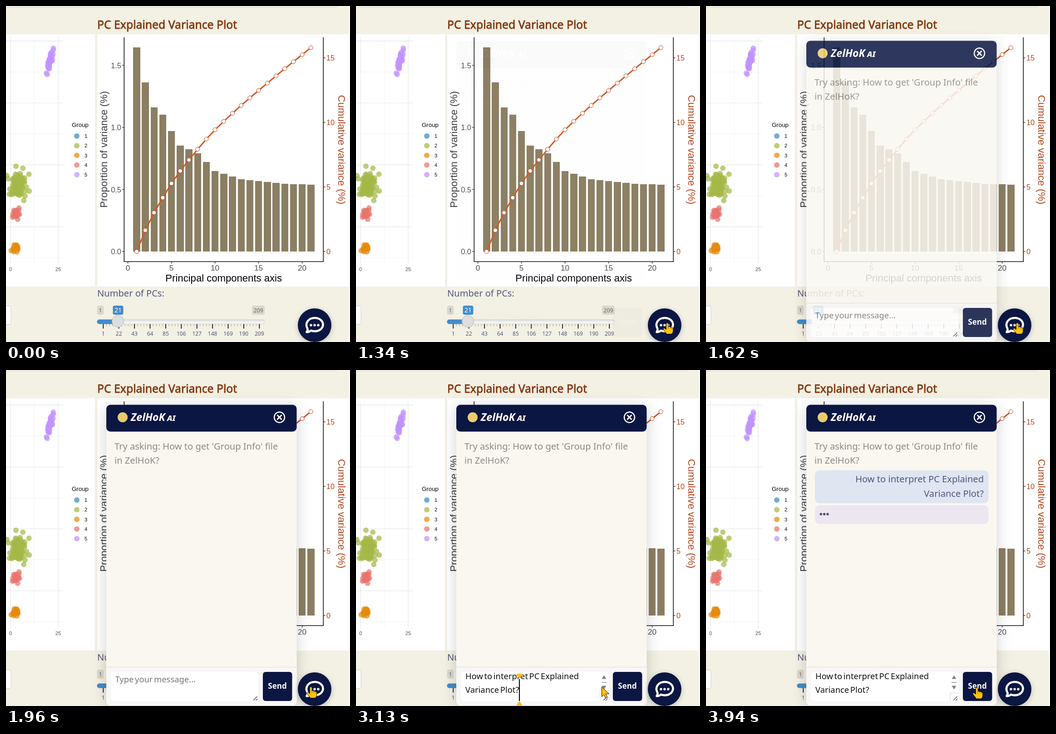
These frames come from a looping animation (758 px wide and 739 px high, 8 s). An HTML page:

```html
<!DOCTYPE html>
<html lang="en">
<head>
<meta charset="utf-8">
<title>Explained variance with chat assistant</title>
<style>
  html, body { margin: 0; width: 100%; height: 100%; overflow: hidden; background: #f3f0e4; }
  svg { display: block; }
  text { font-family: "Noto Sans", "Open Sans", sans-serif; white-space: pre; }
  .plot text { font-family: "Liberation Sans", Arial, sans-serif; }
  .mid { text-anchor: middle; }
  .end { text-anchor: end; }
  .brand { font-weight: 700; font-style: italic; }
  .field { word-spacing: -2.2px; }
  #panel { filter: drop-shadow(0 5px 16px rgba(0, 0, 0, .18)); }
  #button { filter: drop-shadow(0 3px 6px rgba(0, 0, 0, .22)); }
</style>
</head>
<body>
<svg id="stage" width="758" height="739" viewBox="0 0 758 739"></svg>
<script>
const NAVY = '#0b1642', BAR = '#8b7e62', RUST = '#b3441b', LINE = '#d4571f', INK = '#50557a';
const AXIS = '#4d4d4d', BROWN = '#83390f', GOLD = '#ffc20e';
const GROUPS = ['#3d8dc4', '#a3b848', '#e68a0c', '#e8746e', '#c093fd'];
const BRAND = 'ZelHoK';
const QUESTION = ['How to interpret PC Explained', 'Variance Plot?'];

const range = n => [...Array(n).keys()];
const rect = (x, y, w, h, fill, extra = '') =>
  `<rect x="${x}" y="${y}" width="${w}" height="${h}" fill="${fill}" ${extra}/>`;
const dot = (x, y, r, fill, extra = '') =>
  `<circle cx="${x}" cy="${y}" r="${r}" fill="${fill}" ${extra}/>`;
const line = (x1, y1, x2, y2, stroke, w = 1) =>
  `<path d="M${x1} ${y1}L${x2} ${y2}" stroke="${stroke}" stroke-width="${w}"/>`;
const text = (s, x, y, size, fill, cls = '', extra = '') =>
  `<text x="${x}" y="${y}" font-size="${size}" fill="${fill}" class="${cls}" ${extra}>${s}</text>`;

let seed = 11;
const rnd = () => (seed = (seed * 16807) % 2147483647) / 2147483647;
const gauss = () => rnd() + rnd() + rnd() + rnd() - 2;

// Piecewise linear value through points [x, value]
function curve(points, x) {
  const i = Math.max(1, points.findIndex(p => p[0] >= x));
  const [[x0, v0], [x1, v1]] = [points[i - 1], points[i]];
  return v0 + (v1 - v0) * (x - x0) / (x1 - x0);
}

function cluster(group, n, cx, cy, sx, sy, lean = 0) {
  return range(n).map(() => {
    const dy = gauss() * sy, dx = gauss() * sx + dy * lean;
    return dot((cx + dx).toFixed(1), (cy + dy).toFixed(1), 6, GROUPS[group - 1], 'fill-opacity=".72"');
  }).join('');
}

function scatter() {
  let s = rect(0, 62, 196, 555, '#fff');
  range(8).forEach(i => {
    const y = 77 + i * 68.1;
    s += line(0, y, 125, y, i % 2 ? '#f0f0f0' : '#e9e9e9', i % 2 ? .8 : 1.3);
  });
  range(3).forEach(i => {
    const x = 10 + i * 52.5;
    s += line(x, 70, x, 567, i % 2 ? '#f0f0f0' : '#e9e9e9', i % 2 ? .8 : 1.3);
  });
  s += cluster(5, 36, 96, 122, 6, 21, -.27);
  s += cluster(2, 100, 27, 393, 17, 25);
  s += cluster(4, 24, 23, 456, 6.5, 9);
  s += cluster(3, 26, 21, 534, 6, 7.5);
  s += text('0', 10, 583, 11.2, AXIS, 'mid') + text('25', 115, 583, 11.2, AXIS, 'mid');
  s += text('Group', 145, 266.3, 13.3, '#000');
  GROUPS.forEach((c, i) => {
    const y = 286 + i * 21.25;
    s += dot(156, y, 6, c, 'fill-opacity=".72"') + text(i + 1, 176, y + 4, 11, '#000', 'mid');
  });
  return s;
}

function variance() {
  const x = pc => 268.6 + pc * 19.2, left = v => 540 - v * 273, right = v => 540 - v * 28.4;
  const knots = [[1, 1.643], [2, 1.363], [3, 1.161], [4, 1.104], [5, .969], [6, .852],
    [8, .793], [10, .65], [13, .584], [18, .546], [21, .538]];
  let s = rect(201, 62, 554, 555, '#fff'), total = 0;
  const points = [];
  range(21).forEach(i => {
    const share = curve(knots, i + 1), cx = x(i + 1);
    s += rect(cx - 7.7, left(share), 15.4, share * 273, BAR, 'shape-rendering="crispEdges"');
    points.push([cx, right(total)]);
    total += share;
  });
  s += `<polyline points="${points.join(' ')}" fill="none" stroke="${LINE}" stroke-width="3"/>`;
  for (const [cx, cy] of points) s += dot(cx, cy, 4.5, '#fff', `stroke="${RUST}"`);
  s += `<path d="M260.300 69V562.300H699.300V69" fill="none" stroke="#111" stroke-width="1.600"/>`;
  range(5).forEach(i => {
    const tx = x(i * 5);
    s += line(tx, 563, tx, 566.5, '#333', 1.4) + text(i * 5, tx, 582, 17.2, AXIS, 'mid');
    if (i > 3) return;
    const yl = left(i / 2), yr = right(i * 5);
    s += line(256, yl, 260, yl, '#333', 1.4) + text((i / 2).toFixed(1), 254, yl + 6, 16.4, AXIS, 'end');
    s += line(700, yr, 703.5, yr, '#333', 1.4) + text(i * 5, 706, yr + 6, 16.4, RUST);
  });
  s += text('Principal components axis', 479.7, 606, 22.1, '#000', 'mid');
  s += text('Proportion of variance (%)', 0, 0, 22.1, '#3c3c3c', 'mid', 'transform="translate(223 315.5) rotate(-90)"');
  s += text('Cumulative variance (%)', 0, 0, 22.1, RUST, 'mid', 'transform="translate(732 316) rotate(90)"');
  return s;
}

function slider() {
  const badge = (s, x, w, size, fill, ink) =>
    rect(x - w / 2, 659, w, 20, fill, 'rx="4"') + text(s, x, 673.5, size, ink, 'mid');
  let s = text('Number of PCs:', 201, 639, 20.1, INK);
  s += badge(1, 208, 14.5, 12.3, '#dad7cc', '#666') + badge(209, 556, 28, 12.3, '#dad7cc', '#666')
     + badge(21, 247, 23, 14, '#428bca', '#fff');
  s += rect(201, 690, 368.5, 9, 'url(#track)', 'rx="4.5" stroke="#cfcdc4"');
  s += rect(200.5, 689.5, 44, 10, '#428bca', 'rx="5"');
  range(51).forEach(i => {
    const x = 214.3 + i * 6.88, value = Math.min(209, 1 + i / 5 * 21);
    s += i % 5 ? line(x, 700, x, 704.5, '#999') : line(x, 699.5, x, 709.5, '#111', 1.8);
    if (i % 5 === 0) s += text(value, x, 725, 12, INK, 'mid');
  });
  return s + dot(246.5, 693.5, 13, '#dedede', 'stroke="#b2b2b2"');
}

function panel() {
  let s = rect(221, 76.5, 419.5, 661.5, '#faf7f0', 'rx="9"');
  s += `<path d="M221 653.500H640.500V729a9 9 0 0 1-9 9H230a9 9 0 0 1-9-9Z" fill="#f8f7f6"/>`
     + line(221, 653.5, 640.5, 653.5, '#dedcd8');
  s += rect(221, 76.5, 419.5, 59, NAVY, 'rx="9"') + dot(257, 104, 11, '#eccb6e');
  s += text(BRAND, 275, 111.5, 23, '#fff', 'brand') + text('ᴀɪ', 355, 111.5, 22, '#fff', 'brand');
  s += dot(602.5, 104, 11.5, 'none', 'stroke="#fff" stroke-width="2.4"')
     + `<path d="M598.300 99.800l8.400 8.400m0-8.400l-8.400 8.400" stroke="#fff" stroke-width="3" stroke-linecap="round"/>`;
  s += text("Try asking: How to get 'Group Info' file", 239, 175, 20.1, '#8a8a88')
     + text(`in ${BRAND}?`, 239, 206, 20.1, '#8a8a88');
  s += `<g id="asked">${rect(240, 220.5, 382.5, 72.5, '#dfe6f2', 'rx="10"')}`
     + QUESTION.map((q, i) => text(q, 612, 247 + i * 31.5, 20.1, INK, 'end')).join('') + '</g>';
  s += `<g id="waiting">${rect(240, 297.5, 382.5, 41, '#ece6f1', 'rx="10"')}`
     + range(3).map(i => dot(253.2 + i * 7.4, 317, 2.7, '#474d76')).join('') + '</g>';
  s += rect(231, 664, 325, 64, '#fff', 'rx="8"');
  s += `<g id="hint">${text('Type your message...', 240.5, 686.5, 18.4, '#777', 'field')}</g>`;
  s += '<g id="typed">' + QUESTION.map((q, i) => text(q, 241, 680 + i * 29.5, 18.4, '#111', 'field')).join('')
     + `<path d="M541.500 679.500l5-8 5 8ZM541.500 694.500l5 8 5-8Z" fill="#808080"/>`
     + line(541, 687.3, 552, 687.3, '#888', 1.4)
     + `<path d="M538 728V710.500H556" stroke="#d8d8d8" fill="none"/></g>`;
  s += `<path d="M545 726.500l8.500-8.500M550 727l4-4" stroke="#444" stroke-width="1.300"/>`;
  return s + rect(566, 664, 64.5, 64, NAVY, 'rx="6"') + text('Send', 598, 701, 17, '#fff', 'mid', 'font-weight="700"');
}

function chatButton() {
  return dot(680, 702, 37, NAVY)
    + `<path d="M664 709C658 698 666 686 680.500 686c10 0 18 6.500 18 14.700s-8 14.700-18 14.700c-3 0-6-.6-8.400-1.600-2.500 2.200-5.800 3.400-9.600 3.400 1.900-2.600 2.800-5.200 1.500-8.200Z" fill="none" stroke="#fff" stroke-width="4.600" stroke-linejoin="round"/>`
    + range(3).map(i => dot(672 + i * 8, 702, 2.7, '#fff')).join('');
}

// Pointer shapes, each with its hot spot at 0,0
const beam = 'M-4-10Q0-10 0-7Q0-10 4-10M0-8V8M-4 10Q0 10 0 7Q0 10 4 10';
const shapes = {
  arrow: `<path d="M0 0V21.500l5-4.500 3.600 8 4-1.800-3.500-7.700 7-.5Z" fill="${GOLD}" stroke="#111" stroke-linejoin="round"/>`,
  hand: `<path d="M-2.700 2.500C-2.700-1 2.300-1 2.300 2.500V9c1-1.500 4-1 4.200.7 1-1.200 3.400-.6 3.600 1 1-.8 2.700 0 2.700 1.800V17c0 4-2 6.500-4 7.500H-1.500C-3 21-7.500 17-8.700 14.500c-1-2.500 1.500-3.800 3.300-2.200l2.700 2.400Z" fill="${GOLD}" stroke="#111" stroke-linejoin="round"/>`
    + `<path d="M2.300 9v4M6.500 10v3.500M10 11v3" stroke="#7a5a00" stroke-width=".8"/>`,
  beam: `<path d="${beam}" fill="none" stroke="#111" stroke-width="3.400"/><path d="${beam}" fill="none" stroke="${GOLD}" stroke-width="1.800"/>`
};
const grip = y => `<path d="M-6.500-4Q0-8.500 6.500-4Q5 1 0 5.500Q-5 1-6.500-4Z" transform="translate(0 ${y}) scale(1 ${-Math.sign(y)})" fill="#f9bd1a"/>`;

const $ = id => document.getElementById(id);
$('stage').innerHTML =
  `<defs><linearGradient id="track" x2="0" y2="1"><stop stop-color="#dedede"/><stop offset="1" stop-color="#fff"/></linearGradient></defs>`
  + rect(0, 0, 758, 739, '#f3f0e4') + rect(755, 0, 3, 739, '#faf8f2') + line(0, 2.5, 730, 2.5, '#d9d5ca')
  + text('PC Explained Variance Plot', 201, 50, 24.75, BROWN, '', `stroke="${BROWN}" stroke-width=".8"`)
  + `<g class="plot">${scatter()}${variance()}</g>`
  + rect(-10, 659.5, 21, 41, '#fff', 'rx="4" stroke="#cfccc2"')
  + slider()
  + `<g id="panel">${panel()}</g>`
  + `<g id="focus"><g id="caret">${line(0, -24, 0, 24, '#000', 2)}</g>${grip(-30.5)}${grip(30.5)}</g>`
  + `<g id="button">${chatButton()}</g>`
  + `<g id="pointer">${Object.keys(shapes).map(k => `<g id="${k}">${shapes[k]}</g>`).join('')}</g>`;

const LOOP = 8000, TICK = 70;
const OPEN = 1340, FOCUS = 2380, PASTE = 2850, BLINK = 3480, SEND = 3740;
const show = (id, on) => $(id).style.display = on ? '' : 'none';
const place = (id, x, y) => $(id).setAttribute('transform', `translate(${x} ${y})`);
const hold = (t, from) => from + Math.floor((t - from) / TICK) * TICK;

// Pointer stops: time, x, y
const stops = [[70, 750, 689], [280, 716, 675], [670, 686, 697], [1890, 686, 697], [1960, 672, 697],
  [FOCUS, 452, 686], [PASTE, 452, 686], [3130, 541.5, 697], [3340, 597, 698.5], [LOOP, 597, 698.5]];

function pointerAt(t) {
  const from = stops.filter(s => s[0] <= t).pop()[0];
  const held = hold(t, from);
  return [1, 2].map(k => curve(stops.map(s => [s[0], s[k]]), held));
}

function shapeAt(x, y) {
  const onSend = x > 566 && x < 631;
  if (onSend || Math.hypot(x - 680, y - 702) < 37) return 'hand';
  return x < 538 ? 'beam' : 'arrow';
}

function fade(t) {
  if (t < OPEN) return 0;
  const p = Math.min(1, (hold(t, OPEN) - OPEN + 35) / 420);
  return .5 - Math.cos(Math.PI * p) / 2;
}

function draw(t) {
  show('pointer', t >= stops[0][0]);
  if (t >= stops[0][0]) {
    const [x, y] = pointerAt(t), shape = shapeAt(x, y);
    place('pointer', x, y);
    for (const k in shapes) show(k, k === shape);
  }
  const alpha = fade(t), pasted = t >= PASTE;
  show('panel', alpha > 0);
  $('panel').style.opacity = alpha;
  show('hint', !pasted);
  show('typed', pasted);
  show('focus', t >= FOCUS && t < SEND);
  show('caret', t < BLINK);
  place('focus', pasted ? 360 : 241, pasted ? 704 : 681);
  show('asked', t >= SEND);
  show('waiting', t >= SEND + TICK);
}

const start = performance.now();
function frame() {
  draw((performance.now() - start) % LOOP);
  requestAnimationFrame(frame);
}
frame();
</script>
</body>
</html>
```
